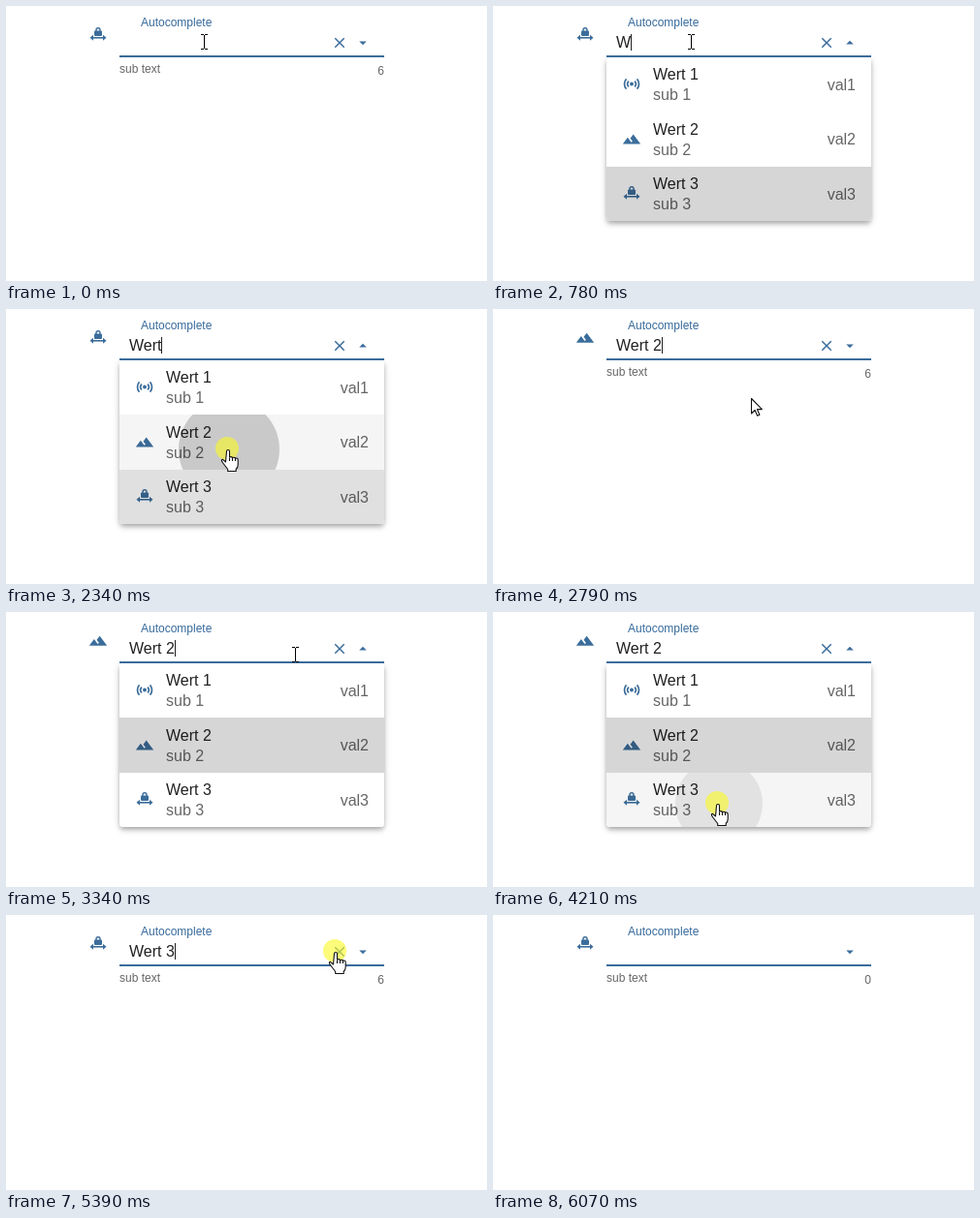
Write an HTML page with a canvas that moves like this. It is 496 px wide and 284 px high and loops after 6.39 s.

```html
<!DOCTYPE html>
<html lang="en">
<head>
<meta charset="utf-8">
<title>Autocomplete</title>
<style>
html, body { margin: 0; width: 100%; height: 100%; overflow: hidden; background: #fff; }
canvas { display: block; }
</style>
</head>
<body>
<canvas id="stage" width="496" height="284"></canvas>
<script>
const ctx = document.getElementById('stage').getContext('2d');
const LOOP = 6390;
const BLUE = '#3b6d9b';
const MENU = { x: 117, y: 53, w: 273, h: 169 };
const ROW_PITCH = 56.5;

// [start, text]
const TYPING = [[0, ''], [780, 'W'], [1020, 'We'], [1160, 'Wer'], [1310, 'Wert'],
  [2490, 'Wert 2'], [4380, 'Wert 3'], [5550, '']];
// [start, opacity]
const MENU_FADE = [[0, 0], [780, 1], [2490, .5], [2560, 0], [3120, .35], [3200, .75],
  [3270, 1], [4380, .5], [4450, 0]];
const CARET_TOGGLES = [550, 1620, 2100, 2900, 3340, 3810, 4300, 4830, 5320, 5550];
const PRESSES = [[2260, 2490], [3050, 3200], [4210, 4380], [5240, 5550]];
// [first step, last step, number of steps, x, y]
const MOVES = [[1950, 2180, 4, 229, 145], [2560, 2560, 1, 234, 139], [2640, 2900, 4, 298, 44],
  [3570, 4130, 8, 232, 198], [4450, 4680, 4, 257, 43], [4770, 4830, 2, 329, 42],
  [4920, 5070, 3, 340, 38], [5550, 5920, 6, 458, 267]];

const MOUNTAIN = new Path2D('M14 6l-3.75 5 2.85 3.8-1.6 1.2C9.81 13.75 7 10 7 10l-6 8h22z');
const CROSS = new Path2D('M19 6.4L17.6 5 12 10.6 6.4 5 5 6.4 10.6 12 5 17.6 6.4 19 12 13.4 17.6 19 19 17.6 13.4 12z');
const ARROW_DOWN = new Path2D('M7 10l5 5 5-5z');
const ARROW_UP = new Path2D('M7 14l5-5 5 5z');
const HAND = new Path2D('M-1.5 2a1.5 1.5 0 0 1 3 0v6q2-1 3 .5q2-.8 3 .7q2.5-.6 2.7 1.6v5q0 3-2 4.5v2.2h-8.5v-2l-5-6.5q-2.5-3.5-.2-3.6l3 2.6z');
const POINTER = new Path2D('M.5.5v15.5l3.6-3.5 2.5 5.7 2.3-1-2.5-5.6h5z');

const latest = (list, t) => list.filter(([start]) => start <= t).pop()[1];

function text(str, x, y, size, color, align = 'left') {
  ctx.font = `${size}px "Liberation Sans", Arial, sans-serif`;
  ctx.textAlign = align;
  ctx.fillStyle = color;
  ctx.fillText(str, x, y);
}

function glyph(path, cx, cy, size) {
  ctx.save();
  ctx.translate(cx - size / 2, cy - size / 2);
  ctx.scale(size / 24, size / 24);
  ctx.fillStyle = BLUE;
  ctx.fill(path);
  ctx.restore();
}

function mountain(cx, cy) {
  glyph(MOUNTAIN, cx, cy, 20);
}

function sensor(cx, cy) {
  ctx.fillStyle = ctx.strokeStyle = BLUE;
  ctx.lineWidth = 1.7;
  ctx.beginPath();
  ctx.arc(cx, cy, 1.9, 0, 2 * Math.PI);
  ctx.fill();
  for (const r of [4.2, 7.5]) {
    for (const side of [0, Math.PI]) {
      ctx.beginPath();
      ctx.arc(cx, cy, r, side - .75, side + .75);
      ctx.stroke();
    }
  }
}

function lock(cx, cy) {
  ctx.fillStyle = ctx.strokeStyle = BLUE;
  ctx.lineWidth = 1.4;
  ctx.beginPath();
  ctx.arc(cx, cy - 4.3, 2, Math.PI, 0);
  ctx.lineTo(cx + 2, cy - 3);
  ctx.moveTo(cx - 2, cy - 4.3);
  ctx.lineTo(cx - 2, cy - 3);
  ctx.stroke();
  ctx.beginPath();
  ctx.roundRect(cx - 4, cy - 3.5, 8, 5.5, 1);
  ctx.fill();
  ctx.fillRect(cx - 6, cy + 3, 12, 1.6);
  for (const s of [-1, 1]) {
    ctx.beginPath();
    ctx.moveTo(cx + s * 8.5, cy + 3.8);
    ctx.lineTo(cx + s * 5, cy + .8);
    ctx.lineTo(cx + s * 5, cy + 6.8);
    ctx.fill();
  }
}

function mouseAt(t) {
  let x = 204, y = 37;
  for (const [first, last, steps, tx, ty] of MOVES) {
    if (t < first) break;
    const gap = (last - first) / (steps - 1) || 1;
    const p = Math.min(steps, Math.floor((t - first) / gap + .01) + 1) / steps;
    x += (tx - x) * p;
    y += (ty - y) * p;
  }
  return { x: Math.round(x), y: Math.round(y) };
}

function drawField(t, value, open) {
  text('Autocomplete', 139, 21, 12, '#36699b');
  (value === 'Wert 2' ? mountain : lock)(95, value === 'Wert 2' ? 29.7 : 29);
  text(value, 127, 43, 16, '#212121');
  if (CARET_TOGGLES.filter(at => at <= t).length % 2) {
    ctx.fillStyle = '#222';
    ctx.fillRect(Math.round(127 + ctx.measureText(value).width), 29, 1, 17);
  }
  if (t < 5550) glyph(CROSS, 344, 38, 18);
  glyph(open ? ARROW_UP : ARROW_DOWN, 368, 38, 18);
  text('sub text', 117, 69, 12, '#666');
  text(t < 5550 ? '6' : '0', 390, 71, 12, '#666', 'right');
  ctx.fillStyle = BLUE;
  ctx.fillRect(117, 51, 273, 2);
}

function drawSurface() {
  const { x, y, w, h } = MENU;
  const shadows = [[2, 4, 1, .2], [4, 5, 0, .14], [1, 10, 0, .12]];
  ctx.save();
  ctx.beginPath();
  ctx.rect(0, y, 496, 231);
  ctx.clip();
  ctx.fillStyle = '#fff';
  for (const [dy, blur, inset, alpha] of shadows) {
    ctx.shadowColor = `rgba(0,0,0,${alpha})`;
    ctx.shadowOffsetY = dy;
    ctx.shadowBlur = blur;
    ctx.beginPath();
    ctx.roundRect(x + inset, y + inset, w - 2 * inset, h - 2 * inset, 4);
    ctx.fill();
  }
  ctx.restore();
  ctx.beginPath();
  ctx.roundRect(x, y, w, h, [0, 0, 4, 4]);
  ctx.fillStyle = '#fff';
  ctx.fill();
  ctx.clip();
}

function drawRipple(mouse, age) {
  const k = Math.floor(age / 75);
  ctx.fillStyle = `rgba(0,0,0,${Math.min(.18, .08 + .1 * k)})`;
  ctx.beginPath();
  ctx.arc(mouse.x + 1, mouse.y, 45 + 7 * k + 40 * k * Math.max(0, k - 1), 0, 2 * Math.PI);
  ctx.fill();
}

function drawMenu(t, alpha, mouse) {
  const selected = t < 3000 ? 2 : 1;
  const press = t < 3000 ? 2260 : 4210;
  const focused = t < (t < 3000 ? press : press + 80);
  ctx.save();
  ctx.globalAlpha = alpha;
  drawSurface();
  [sensor, mountain, lock].forEach((icon, i) => {
    const n = i + 1;
    const shift = ROW_PITCH * i;
    const top = Math.round(MENU.y + 56.4 * i);
    const bottom = Math.round(MENU.y + 56.4 * n);
    icon(143, [80.5, 137.5, 193][i]);
    text('Wert ' + n, 165, Math.round(76.4 + shift), 16, '#212121');
    text('sub ' + n, 165, Math.round(97.4 + shift), 16, '#666');
    text('val' + n, 374, Math.round(86.7 + shift), 16, '#666', 'right');

    const hovered = mouse.y >= top && mouse.y < bottom;
    const shade = i === selected ? (focused ? .16 : .12) : hovered ? .04 : 0;
    ctx.save();
    ctx.beginPath();
    ctx.rect(MENU.x, top, MENU.w, bottom - top);
    ctx.clip();
    ctx.fillStyle = `rgba(0,0,0,${shade})`;
    ctx.fillRect(MENU.x, top, MENU.w, bottom - top);
    if (hovered && t >= press) drawRipple(mouse, t - press);
    ctx.restore();
  });
  ctx.restore();
}

function outlined(path) {
  ctx.fillStyle = '#fff';
  ctx.strokeStyle = '#111';
  ctx.lineWidth = 1.1;
  ctx.lineJoin = 'round';
  ctx.fill(path);
  ctx.stroke(path);
}

function drawMouse(t, { x, y }, open) {
  if (t >= 6070) return;
  if (PRESSES.some(([from, to]) => t >= from && t < to)) {
    ctx.fillStyle = 'rgba(250,248,40,.62)';
    ctx.beginPath();
    ctx.arc(x - 1, y - 1, 12, 0, 2 * Math.PI);
    ctx.fill();
  }
  const inField = y > 26 && y < 53;
  ctx.save();
  ctx.translate(x, y);
  if ((open && y >= MENU.y) || (inField && x > 332)) {
    outlined(HAND);
    ctx.beginPath();
    for (const dx of [1.5, 4.5, 7.5]) {
      ctx.moveTo(dx, 8.5);
      ctx.lineTo(dx, 12);
    }
    ctx.stroke();
  } else if (inField) {
    ctx.fillStyle = '#000';
    ctx.fillRect(0, -7, 1, 14);
    for (const dy of [-8, 7]) {
      ctx.fillRect(-3, dy, 3, 1);
      ctx.fillRect(1, dy, 3, 1);
    }
  } else {
    outlined(POINTER);
  }
  ctx.restore();
}

function draw(t) {
  const mouse = mouseAt(t);
  const fade = latest(MENU_FADE, t);
  ctx.fillStyle = '#fff';
  ctx.fillRect(0, 0, 496, 284);
  drawField(t, latest(TYPING, t), fade > 0);
  if (fade) drawMenu(t, fade, mouse);
  drawMouse(t, mouse, fade > 0);
}

const began = performance.now();
function tick() {
  draw((performance.now() - began) % LOOP);
  requestAnimationFrame(tick);
}
tick();
</script>
</body>
</html>
```
